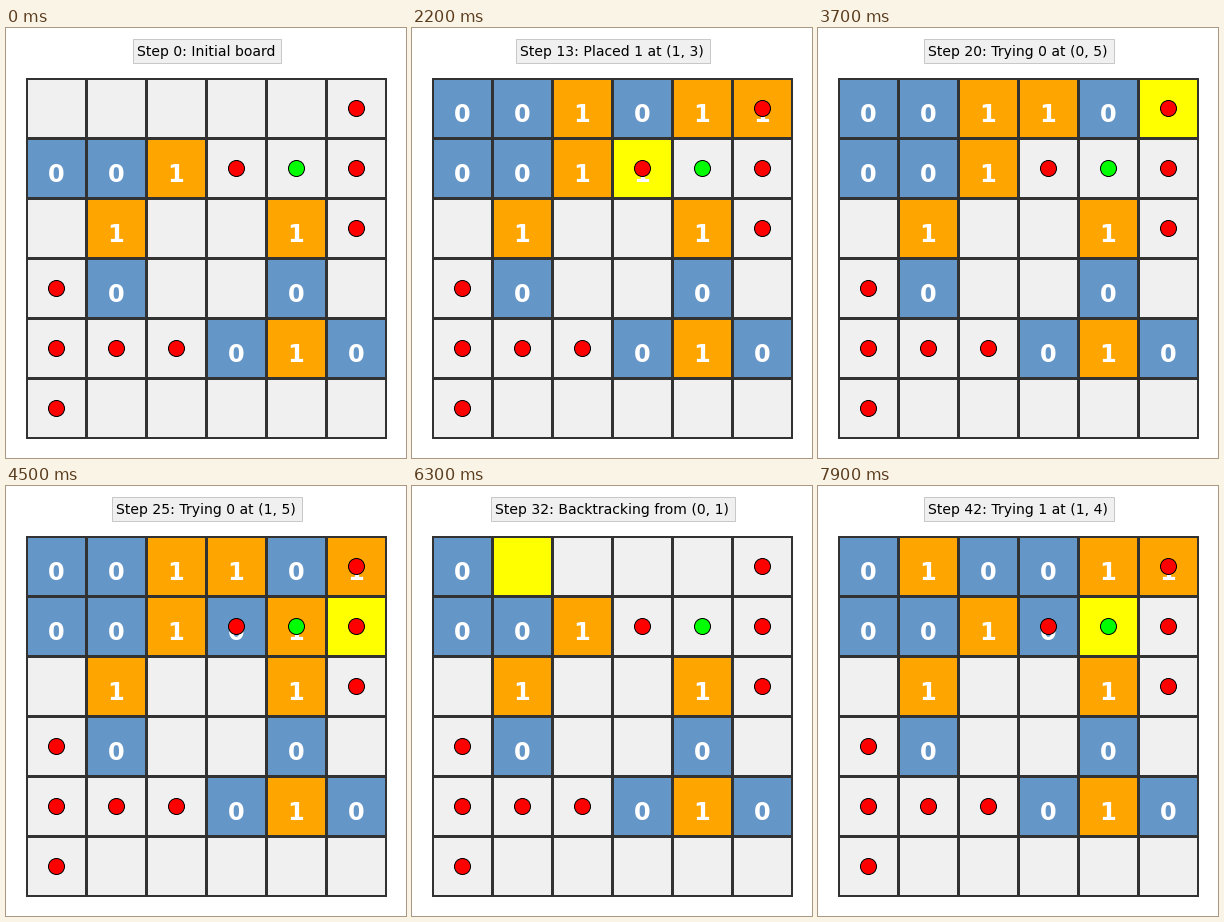
Write a matplotlib script that moves like this. It is 400 px wide and 430 px high and loops after 8 s.

```python
import matplotlib.pyplot as plt
from matplotlib.animation import FuncAnimation
from matplotlib.patches import Circle, Rectangle

W, H, CELL, LEFT, TOP, N = 400, 430, 60, 20, 50, 6
FRAMES, INTERVAL = 80, 100
PT = 0.72  # points per pixel at 100 dpi

EMPTY, LINE, YELLOW = "#f0f0f0", "#323232", "#ffff00"
FILL = {None: EMPTY, 0: "#6496c8", 1: "#ffa500"}
GIVEN = ["......", "001...", ".1..1.", ".0..0.", "...010", "......"]
RED = [(0, 5), (1, 3), (1, 5), (2, 5), (3, 0), (4, 0), (4, 1), (4, 2), (5, 0)]
GREEN = [(1, 4)]
DIFFER = [((0, 5), (1, 5))]


def line_ok(line):
    if max(line.count(0), line.count(1)) > N // 2:
        return False
    return all(a is None or not a == b == c
               for a, b, c in zip(line, line[1:], line[2:]))


def allowed(board, r, c, v):
    trial = [row[:] for row in board]
    trial[r][c] = v
    if not (line_ok(trial[r]) and line_ok([row[c] for row in trial])):
        return False
    return all(trial[a][b] is None or trial[a][b] != trial[d][e]
               for (a, b), (d, e) in DIFFER)


def solve():
    """Yield (caption, board, active cell) for each move of the search."""
    board = [[None if ch == "." else int(ch) for ch in row] for row in GIVEN]
    free = [(r, c) for r in range(N) for c in range(N) if board[r][c] is None]
    step = 0

    def state(text, cell=None):
        return f"Step {step}: {text}", [row[:] for row in board], cell

    def search(k):
        nonlocal step
        if k == len(free):
            return True
        r, c = free[k]
        at = f"({r}, {c})"
        for v in (0, 1):
            step += 1
            yield state(f"Trying {v} at {at}", (r, c))
            if not allowed(board, r, c, v):
                continue
            board[r][c] = v
            yield state(f"Placed {v} at {at}", (r, c))
            if (yield from search(k + 1)):
                return True
            board[r][c] = None
            yield state(f"Backtracking from {at}", (r, c))
        return False

    yield state("Initial board")
    yield from search(0)


moves = [move for _, move in zip(range(FRAMES), solve())]

plt.rcParams["font.family"] = "DejaVu Sans"
fig = plt.figure(figsize=(W / 100, H / 100), dpi=100, facecolor="white")
ax = fig.add_axes([0, 0, 1, 1])
ax.set(xlim=(0, W), ylim=(H, 0))
ax.axis("off")

ax.add_patch(Rectangle((LEFT, TOP), N * CELL + 1, N * CELL + 1, fc=LINE, lw=0))
cells, digits = {}, {}
for r in range(N):
    for c in range(N):
        x, y = LEFT + c * CELL, TOP + r * CELL
        cells[r, c] = ax.add_patch(
            Rectangle((x + 2, y + 2), CELL - 3, CELL - 3, lw=0))
        digits[r, c] = ax.text(x + 30, y + 44, "", ha="center", va="baseline",
                               color="white", weight="bold", size=24 * PT)

for color, spots in (("#ff0000", RED), ("#00ff00", GREEN)):
    for r, c in spots:
        ax.add_patch(Circle((LEFT + c * CELL + 30.5, TOP + r * CELL + 30.5), 8,
                            fc=color, ec="black", lw=PT, zorder=4))

box = ax.add_patch(Rectangle((0, 10.5), 1, 24, fc=EMPTY, ec="#c8c8c8", lw=PT))
caption = ax.text(W / 2, 28, "", ha="center", va="baseline",
                  color="black", size=14 * PT)


def draw(i):
    text, board, active = moves[i]
    caption.set_text(text)
    width = round(caption.get_window_extent().width)
    box.set_x(W // 2 - width // 2 - 4.5)
    box.set_width(width + 10)
    for (r, c), cell in cells.items():
        v = board[r][c]
        cell.set_facecolor(YELLOW if (r, c) == active else FILL[v])
        digits[r, c].set_text("" if v is None else str(v))
    return [box, caption, *cells.values(), *digits.values()]


anim = FuncAnimation(fig, draw, frames=FRAMES, interval=INTERVAL,
                     init_func=lambda: draw(0), repeat=True)
plt.show()
```
